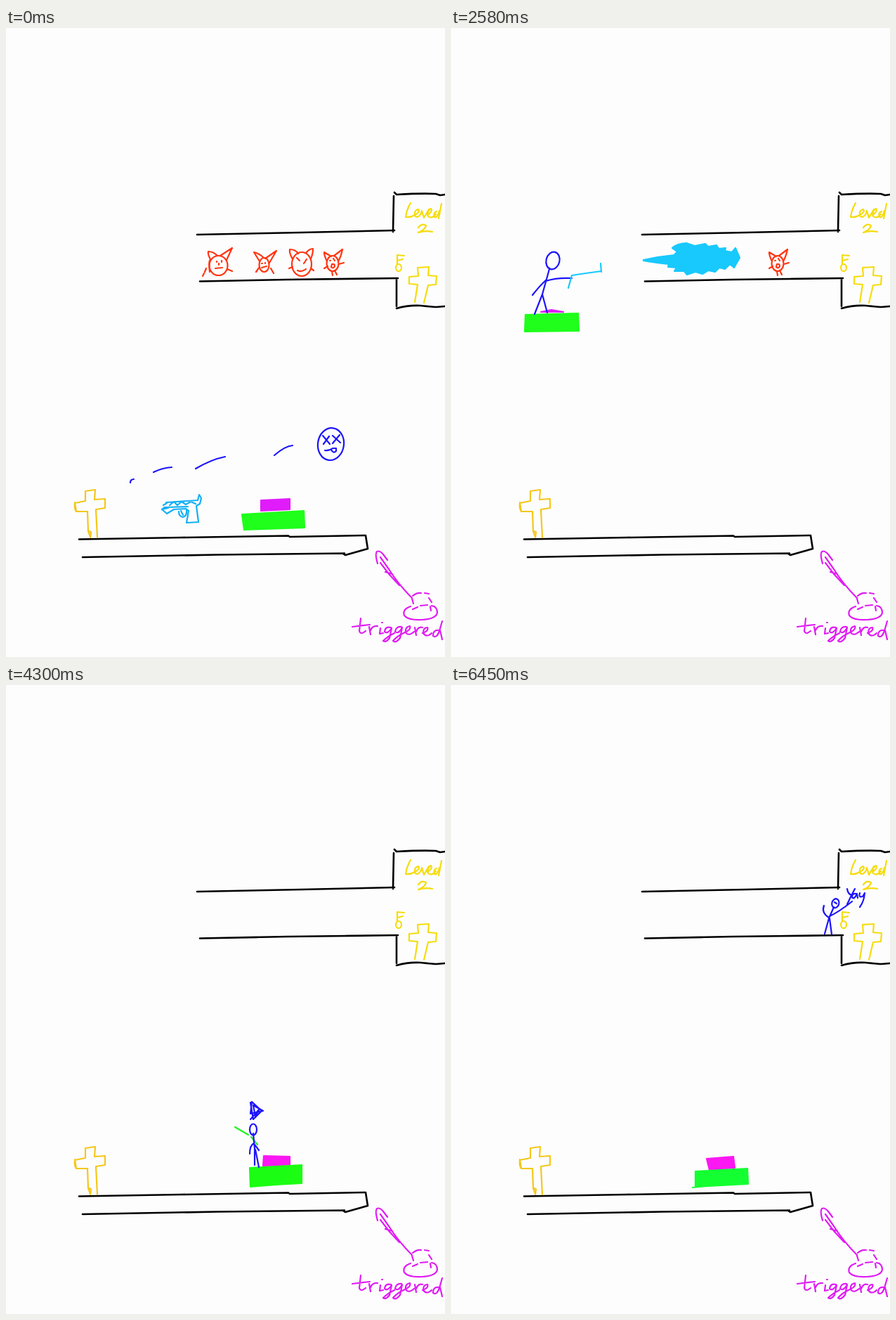
An HTML page for the animation above (6880 ms loop, 625 px wide and 895 px high).

```html
<!DOCTYPE html>
<html lang="en">
<head>
<meta charset="utf-8">
<title>Level 2</title>
<style>
  html, body { margin: 0; width: 100%; height: 100%; overflow: hidden; background: #fdfdfd; }
  svg { display: block; width: 100vw; height: 100vh; }
  path, ellipse { fill: none; stroke: currentColor; stroke-width: 2.2; stroke-linecap: round; stroke-linejoin: round; }
  .wall path { stroke-width: 2.6; }
  .ink { color: #000; }
  .blue { color: #1c14fb; }
  .red { color: #ff3614; }
  .gold { color: #f5c71b; }
  .sun { color: #f6dc0c; }
  .pen { color: #e01cf4; }
  .gun { color: #14b0f5; }
  .cyan { color: #18c9fd; }
  .lime { color: #20f520; }
  .fill path { fill: currentColor; }
  .green { color: #1fff1b; }
  .leaf { color: #1bfe14; }
  .mint { color: #14ff32; }
  .pink { color: #fb18f2; }
  .violet { color: #e01cfb; }
  .step { visibility: hidden; animation: show 6.88s step-end infinite; animation-delay: calc((var(--n) - 16) * 430ms); }
  @keyframes show { 0% { visibility: visible; } 6.25%, 100% { visibility: hidden; } }
</style>
</head>
<body>
<svg viewBox="0 0 625 895" preserveAspectRatio="none">
  <defs>
    <g id="cat4" class="red">
      <ellipse cx="465" cy="335" rx="8.500" ry="11"/>
      <path d="M457 332Q453 324 453 319L463 325M467 324L479 315Q477 325 473 332M458 339L453 342M474 336L481 334M464 346L465 352M468 345L471 351M461 331h1M466 328l2 3"/>
      <path d="M464 336Q468 335 468 339Q466 343 463 340Z" fill="currentColor"/>
    </g>
    <g id="cats">
      <g class="red">
        <ellipse cx="302.500" cy="338" rx="13" ry="14"/>
        <path d="M290 347Q288 332 291 329Q287 322 288 318Q295 318 301 324M305 324L322 313L314 330M285 342L283 347M282 349L280 353M315 343L322 346M300 332v1M307 331v2M303 335v2M298 342L308 341"/>
        <ellipse cx="367.500" cy="337" rx="7" ry="10"/>
        <path d="M361 332L353 319Q361 321 367 327M369 328L385 317L375 334M361 340L356 347M377 342L381 349M364 335h1M369 334v1M364 341L371 339"/>
        <ellipse cx="421" cy="336" rx="14" ry="17"/>
        <path d="M408 329Q403 320 404 315Q412 315 416 321M427 320Q432 314 437 314Q437 322 434 328M408 340L403 342M434 342L438 345M414 327L418 331M428 329L424 335M415 345Q421 348 427 343"/>
      </g>
      <use href="#cat4"/>
    </g>

    <g id="start">
      <g class="fill violet"><path d="M363 672L404 670V685L363 687Z"/></g>
      <g class="fill green"><path d="M336 692L424 687L425 711L339 714Z"/></g>
    </g>
    <path id="pistol" class="gun" d="M228 675L273 672L275 664L278 669L276 677L271 680L274 703L257 704L260 687L256 684L239 685L229 691L222 685L226 682L259 681M222 685L231 683M229 676L224 679M233 679L239 674L244 679L250 674L256 678L263 674L270 677M246 688Q246 695 252 696Q258 694 257 686M249 687L252 693"/>

    <g id="rider" class="blue">
      <ellipse cx="143.500" cy="330" rx="8.500" ry="10.500"/>
      <path d="M141 340L133 356L128 375L116 403M133 356Q122 361 113 375M133 356L160 360M128 376L140 372V395M135 323V336"/>
    </g>
    <path id="aim" class="cyan" d="M159 369V354Q174 349 191 348M190 338L192 350"/>
    <g id="lift">
      <g class="fill violet"><path d="M128 395L163 394V407L128 409Z"/></g>
      <g class="fill green"><path d="M105 414L181 408V430L107 431Z"/></g>
    </g>

    <g id="man" class="blue">
      <ellipse cx="145" cy="331" rx="9.500" ry="12.500" transform="rotate(14 145 331)"/>
      <path d="M140 343L130 379L119 407M136 358Q127 366 116 380M135 360Q150 355 172 356M130 379L137 405"/>
    </g>
    <path id="shot" class="cyan" d="M167 370L172 352Q191 349 214 346M213 335L214 347"/>
    <g id="pressed">
      <g class="fill violet"><path d="M128 404L143 401L160 404Z"/></g>
      <g class="fill green"><path d="M106 408L181 406L182 431L105 432Z"/></g>
    </g>

    <g id="hang" class="blue">
      <ellipse cx="268.500" cy="358" rx="5" ry="6"/>
      <path d="M264 362Q249 361 246 371M234 375Q241 369 248 370M245 372Q246 381 252 392M248 371L261 387M253 369L264 379"/>
    </g>
    <g id="drop">
      <g class="fill pink"><path d="M176 467L217 466V482L176 484Z"/></g>
      <g class="fill leaf"><path d="M154 487L237 480L238 509L200 514L186 517L154 517Z"/></g>
    </g>

    <g id="worried">
      <g class="fill pink"><path d="M367 670L404 671V684L366 684Z"/></g>
      <g class="fill leaf"><path d="M347 687L421 683V709L385 711L348 714Z"/></g>
      <path class="lime" d="M326 629L345 640M349 643L358 654"/>
      <g class="blue">
        <ellipse cx="352" cy="632.500" rx="5" ry="8"/>
        <path d="M352 638L354 660V683M353 652Q347 655 347 667M354 654L360 662M355 661L360 686M348 594L352 618L364 606L350 593L348 610L366 606L352 598L355 614L361 603L348 618"/>
      </g>
    </g>

    <g id="ride">
      <g class="fill pink"><path d="M135 389L173 390V403L135 404Z"/></g>
      <g class="fill leaf"><path d="M116 406L189 402L190 429L155 431L115 433Z"/></g>
    </g>
    <g id="cheer" class="blue">
      <ellipse cx="547.500" cy="310.500" rx="5" ry="6.500" transform="rotate(15 547 310)"/>
      <path d="M545 316L538 332L532 354M538 331Q527 324 531 314M539 329Q552 323 571 308M539 332L542 355M546 309L549 311"/>
    </g>
    <g id="end">
      <g class="fill pink"><path d="M364 674L402 671L404 687L368 690Z"/></g>
      <g class="fill mint"><path d="M348 692L422 688L423 710L348 714Z"/><path d="M344 715L362 713"/></g>
    </g>
  </defs>

  <g class="wall ink">
    <path d="M272 294L420 291L553 288M552 239L551 290M553 234L556 237Q592 235 612 236L618 238L625 237"/>
    <path d="M276 360.500L400 358L558 356M556 357V396M556 399Q573 394 590 395Q609 397 613 397L625 396"/>
    <path d="M104 727.500L250 725L402 722.500L404 724L512 722L515 741L483 750L480 748M109 753L300 749.500L482 747.500"/>
  </g>
  <path class="gold" d="M120 724L117 716L116 688L100 688Q97 684 98 676L113 673V659L127 657L126 671L141 670V683L128 685L130 725M118 716L121 717L120 725M98 675L100 688"/>
  <g class="sun">
    <path d="M582 390L586 365L574 364V354L587 353L586 341L602 340L601 352L613 353L612 365L601 366L595 391"/>
    <ellipse cx="559" cy="341" rx="4" ry="5"/>
    <path d="M557 336V323L567 324M557 331L565 329"/>
    <path aria-label="Level 2" d="M576 249Q570 259 569 269Q576 270 582 266Q590 262 587 258Q581 259 582 267Q586 272 591 264L592 260L595 270L602 258M600 266Q608 261 605 257Q599 260 601 268Q606 272 612 265M613 261Q608 263 610 269Q614 271 617 260M620 250L616 271M587 284Q592 277 598 281Q597 287 587 291Q597 288 607 290"/>
  </g>
  <g class="pen">
    <path d="M578 811Q558 791 545 770L533 753M529 762Q525 748 528 745Q532 743 537 749L543 757M533 761L546 778L560 793M540 774L550 777"/>
    <path d="M579 808Q585 803 591 804M596 804L602 805M578 812L580 819M602 811L606 817M579 827L586 824M590 822L600 821M604 823L605 829M576 823Q564 827 567 836Q573 843 592 842Q612 841 614 832Q614 823 606 822"/>
    <path aria-label="triggered" d="M505 840L503 858Q505 864 512 858M493 852L518 849M517 852L519 863M519 857Q522 850 529 851M533 854L532 862L537 861M535 846h1M548 853Q540 851 539 859Q543 863 549 854L546 868Q541 875 537 872Q543 866 553 861M563 852Q555 851 554 859Q559 863 564 853L561 868Q555 876 551 872Q557 865 568 860Q577 856 575 851Q568 852 569 860Q573 866 581 859M582 853L584 864M584 859Q587 851 593 853M593 861Q602 858 600 853Q594 853 594 861Q599 868 606 861M616 857Q608 856 608 865Q613 869 617 858L621 844M618 857L621 870"/>
  </g>

  <g class="step" style="--n:0">
    <use href="#cats"/><use href="#start"/><use href="#pistol"/>
    <g class="blue">
      <ellipse cx="462.500" cy="592" rx="18.500" ry="23" transform="rotate(8 462 592)"/>
      <path d="M451 580L461 592M460 581L452 592M465 580L476 590M475 579L465 591M454 601Q460 602 465 598L470 598M463 600Q466 606 470 602V598M177 647Q177 642 182 642M210 632Q222 626 236 625M270 627Q292 614 312 610M382 608Q397 595 408 594"/>
    </g>
  </g>
  <g class="step" style="--n:1">
    <use href="#cats"/><use href="#start"/><use href="#pistol"/><use href="#man" x="46" y="322"/>
  </g>
  <g class="step" style="--n:2">
    <use href="#cats"/><use href="#start"/><use href="#man" x="315" y="191"/><use href="#shot" x="315" y="191"/>
  </g>
  <g class="step" style="--n:3">
    <use href="#cats"/>
    <g transform="translate(135 183)"><use href="#lift"/><use href="#rider"/><use href="#aim"/></g>
    <path class="lime" d="M322 625L337 635M349 644L361 652M374 660L385 667"/>
  </g>
  <g class="step" style="--n:4">
    <use href="#cats"/><use href="#lift"/><use href="#rider"/><use href="#aim"/>
    <path class="lime" d="M178 452L191 471M200 487Q204 495 213 503M224 528Q231 541 240 549M255 572Q255 577 261 580"/>
  </g>
  <g class="step" style="--n:5">
    <use href="#cats"/><use href="#pressed"/><use href="#man"/><use href="#shot"/>
    <g class="fill cyan"><path d="M217 343L236 334L240 325L249 328L258 316L262 328L276 332L269 342L277 352L264 355L258 370L248 358L236 357Z"/></g>
  </g>
  <g class="step" style="--n:6">
    <use href="#cat4"/><use href="#pressed"/><use href="#man"/><use href="#shot"/>
    <g class="fill cyan"><path d="M274 330Q296 325 318 323L322 318L315 313Q321 307 335 306L347 310L362 307L366 311L378 309L381 314L391 313L390 317L400 319L405 313L411 327L403 341L397 336L390 343L382 341L376 347L366 345L358 350L348 347L336 351L332 346L318 346L321 341L309 340L310 336Q290 334 274 331Z"/></g>
  </g>
  <g class="step" style="--n:7">
    <use href="#lift" y="8"/><use href="#man" x="90" y="-10"/>
  </g>
  <g class="step" style="--n:8">
    <use href="#drop"/><use href="#hang"/>
    <path class="blue" aria-label="opsie!" d="M286 373Q280 376 282 382Q287 386 291 381Q292 374 286 373M297 377L298 403M297 379Q304 373 306 380Q305 388 298 389M317 377Q309 378 312 383Q321 387 317 392Q313 395 309 393M322 381L323 393M321 374h1M328 388Q338 386 336 380Q329 378 328 388Q331 397 343 392M350 370L354 390M355 399v1"/>
  </g>
  <g class="step" style="--n:9">
    <use href="#drop" x="106" y="114"/><use href="#hang" x="40" y="38"/>
  </g>
  <g class="step" style="--n:10"><use href="#worried"/></g>
  <g class="step" style="--n:11"><use href="#worried" x="-133" y="-146"/></g>
  <g class="step" style="--n:12">
    <use href="#ride"/>
    <g class="blue">
      <ellipse cx="127" cy="346.500" rx="5" ry="3.500"/>
      <path d="M125 347Q121 366 118 381L120 402Q112 404 105 401M122 362Q135 364 143 356M121 367Q111 373 105 384M119 380Q127 387 130 401L125 402M124 393L123 402L128 405"/>
    </g>
  </g>
  <g class="step" style="--n:13">
    <use href="#ride"/><use href="#cheer" x="-245" y="9"/>
  </g>
  <g class="step" style="--n:14">
    <use href="#end" x="-133" y="-149"/><use href="#cheer" x="-64" y="2"/>
  </g>
  <g class="step" style="--n:15">
    <use href="#end"/><use href="#cheer"/>
    <path class="blue" aria-label="Yay" d="M564 290Q565 297 570 299M575 290Q569 301 564 312M577 297Q571 296 571 302Q574 306 578 297L579 303M582 296Q580 303 586 301L589 296Q588 308 582 316"/>
  </g>
</svg>
</body>
</html>
```
